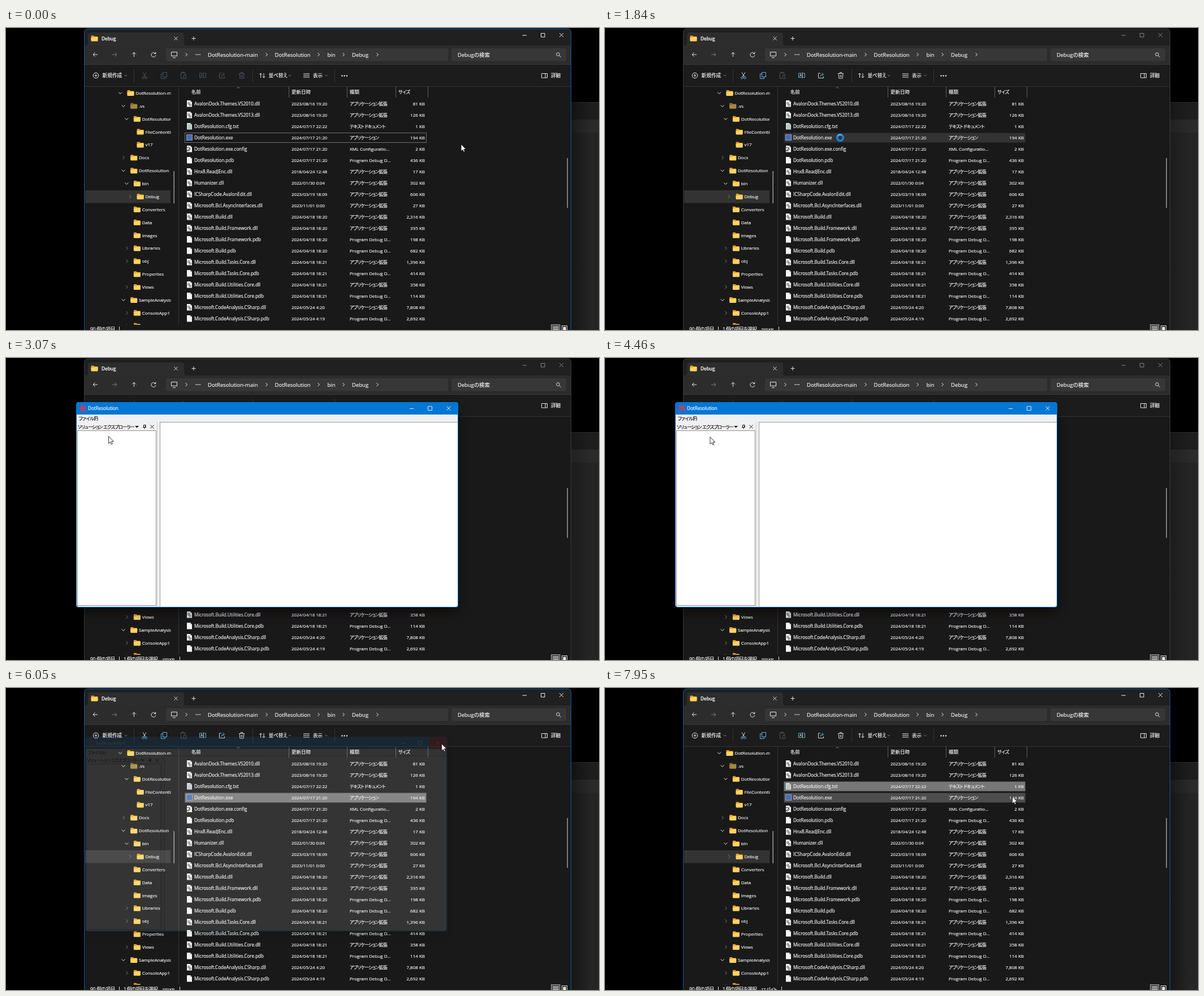
These frames come from a looping animation (1049 by 534 pixels, 8000 ms). An HTML page:

```html
<!DOCTYPE html>
<html lang="ja">
<head>
<meta charset="utf-8">
<title>DotResolution</title>
<style>
html, body { margin: 0; width: 100%; height: 100%; overflow: hidden; background: #000; }
svg { display: block; width: 100vw; height: 100vh; }
text { font: 8px 'Open Sans', 'Noto Sans CJK JP', 'Noto Sans CJK', sans-serif; color: #f4f4f4; fill: currentColor; stroke: currentColor; stroke-width: .18; white-space: pre; }
.kana { font-feature-settings: 'palt'; letter-spacing: -.7px; }
.line { fill: none; stroke: #e6e6e6; stroke-width: 1; }
.dim { stroke: #7c7c7c; }
.ink { stroke: #111; }
.caps, .tool, .acc { fill: none; stroke: #858585; stroke-width: 1; }
.focus .caps { stroke: #f2f2f2; }
.frame { fill: none; stroke: #3b3b3b; }
.focus .frame { stroke: #0d5c9b; }
.tool, .acc, .off { fill: none; stroke: #46535f; }
.ready .tool { stroke: #d4d4d4; }
.ready .acc { stroke: #5fb2e0; }
.cast { filter: drop-shadow(0 9px 9px rgba(0, 0, 0, .5)); }
</style>
</head>
<body>
<svg id="stage" viewBox="0 0 1049 534" preserveAspectRatio="none"></svg>
<script>
const LOOP = 8000, TICK = 68.5;
const BURSTS = [0, 260, 1090, 1840, 2370, 4460, 5300, 6110, 6940, 7610];
const OPEN = 1860, CLOSE = 5945, EXE = 3, CFG = 2;

const text = (x, y, s, size = 8, style = '', attrs = '') =>
  `<text x="${x}" y="${y}" style="font-size:${size}px;${style}" ${attrs}>${s}</text>`;
const kana = (x, y, s, size = 8, style = '') => text(x, y, s, size, style, 'class="kana"');
const box = (x, y, w, h, fill, attrs = '') => `<rect x="${x}" y="${y}" width="${w}" height="${h}" fill="${fill}" ${attrs}/>`;
const path = (d, cls = 'line') => `<path d="${d}" class="${cls}"/>`;
const ring = (x, y, r, cls) => `<circle cx="${x}" cy="${y}" r="${r}" class="${cls}"/>`;
const dots = (xs, y, r) => xs.map(x => `<circle cx="${x}" cy="${y}" r="${r}" fill="#eee"/>`).join('');
const right = (x, y, cls) => path(`M${x - 1.5} ${y - 3}l3 3-3 3`, cls);
const down = (x, y, cls) => path(`M${x - 3} ${y - 1.5}l3 3 3-3`, cls);

function folder(x, y, attrs = '') {
  return `<g transform="translate(${x} ${y})" ${attrs}>
    <path d="M0-4q0-1 1-1h3.5l1.5 1.5h5q1 0 1 1V3H0z" fill="#e9a520"/>
    <path d="M0-1.8h4.5l1.4-1H11q1 0 1 1V4q0 1-1 1H1q-1 0-1-1z" fill="#ffd262"/></g>`;
}

function paper(y, kind) {
  if (kind === 'a') return box(319.5, y - 5.5, 10, 10, '#4a6cb4', 'stroke="#8aa0cc"');
  const marks = {
    d: '<g fill="none" stroke="#777" stroke-width="1.3"><circle cx="3.3" cy="-.8" r="1.5"/><circle cx="5.7" cy="2.2" r="1.5"/></g>',
    t: '<path d="M1.5-2.5h5M1.5-.5h6M1.5 1.5h6M1.5 3.5h6" stroke="#8b9aa2" stroke-width=".7"/>',
    x: '<circle cx="2.5" r="3.2" fill="#eee" stroke="#333"/><path d="M1 4l4-6" stroke="#333"/>'
  };
  return `<g transform="translate(320 ${y})"><path d="M0-6h6l3 3V5.5H0z" fill="${kind === 't' ? '#d4dddd' : '#f4f4f4'}"/>
    <path d="M6-6v3h3z" fill="#aaa"/>${marks[kind] || ''}</g>`;
}

// depth, chevron (v open, > closed, - none), label
const TREE = `0v DotResolution-main
1v .vs
2v DotResolution
3- FileContentIndex
3- v17
1> Docs
1v DotResolution
2v bin
3> Debug
2- Converters
2- Data
2- Images
2> Libraries
2> obj
2- Properties
2> Views
1v SampleAnalysisApp
2> ConsoleApp1
2> ConsoleApp2`.split('\n');

const TYPES = {
  d: 'アプリケーション拡張', t: 'テキスト ドキュメント', a: 'アプリケーション',
  x: 'XML Configuratio...', p: 'Program Debug D...'
};
const FILES = `AvalonDock.Themes.VS2010.dll|2023/08/16 19:20|d|81
AvalonDock.Themes.VS2013.dll|2023/08/16 19:20|d|126
DotResolution.cfg.txt|2024/07/17 22:22|t|1
DotResolution.exe|2024/07/17 21:20|a|194
DotResolution.exe.config|2024/07/17 21:20|x|2
DotResolution.pdb|2024/07/17 21:20|p|436
Hnx8.ReadJEnc.dll|2018/04/24 12:48|d|17
Humanizer.dll|2022/01/30 0:04|d|302
ICSharpCode.AvalonEdit.dll|2023/03/19 18:09|d|606
Microsoft.Bcl.AsyncInterfaces.dll|2023/11/01 0:00|d|27
Microsoft.Build.dll|2024/04/18 18:20|d|2,316
Microsoft.Build.Framework.dll|2024/04/18 18:20|d|395
Microsoft.Build.Framework.pdb|2024/04/18 18:20|p|198
Microsoft.Build.pdb|2024/04/18 18:20|p|682
Microsoft.Build.Tasks.Core.dll|2024/04/18 18:21|d|1,396
Microsoft.Build.Tasks.Core.pdb|2024/04/18 18:21|p|414
Microsoft.Build.Utilities.Core.dll|2024/04/18 18:21|d|358
Microsoft.Build.Utilities.Core.pdb|2024/04/18 18:21|p|114
Microsoft.CodeAnalysis.CSharp.dll|2024/05/24 4:20|d|7,808
Microsoft.CodeAnalysis.CSharp.pdb|2024/05/24 4:19|p|2,692`.split('\n');

function treeRow(row, i) {
  const d = +row[0], y = 115 + 22.87 * i, x = 5.7 * d;
  const chevron = { v: down(202 + x, y), '>': right(202.5 + x, y, 'line dim'), '-': '' }[row[1]];
  return chevron + folder(214.5 + x, y, i === 1 ? 'opacity=".6"' : '') + text(229.3 + x, y + 3, row.slice(3));
}

function fileRow(row, i) {
  const [name, date, kind, size] = row.split('|'), y = 134 + 20 * i;
  const label = 'xp'.includes(kind) ? text : kana;
  return paper(y, kind) + text(333, y + 3, name, 8.05) + text(505, y + 3, date, 7.8) + label(608, y + 3, TYPES[kind]) +
    text(741, y + 3, size + ' KB', 8, 'text-anchor:end');
}

function backdrop() {
  return box(1000, 131, 49, 31, '#1e1e1e') + box(1000, 131, 49, 1, '#303030') + box(1000, 162, 49, 23, '#2b2b2b') +
    box(1000, 185, 49, 349, '#252525') + box(1000, 131, 36, 403, 'url(#shade)', 'id="shadow"');
}

function titleAndNav() {
  return box(138, 1, 862, 540, '#191919', 'rx="6"') +
    '<path d="M139 31V7q0-5 5-5H994q5 0 5 5V31z" fill="#202020"/>' +
    '<path d="M141 31q4 0 4-4V13q0-5 5-5H310q5 0 5 5V27q0 4 4 4z" fill="#2d2d2d"/>' +
    box(139, 31, 860, 33, '#2c2c2c') + box(139, 64, 860, 1, '#393939') + box(139, 65, 860, 38, '#1c1c1c') + box(139, 103, 860, 1, '#333') +
    folder(150.5, 18.5) + text(169, 22, 'Debug', 8.2, 'font-weight:600') +
    path('M297.5 15.5l6 6m0-6l-6 6M328.5 18.5h7m-3.5-3.5v7') +
    path('M913.5 13h7.5M946.5 9.5h6.5v6.5h-6.5zM979 9l7 7m0-7l-7 7', 'caps') +
    path('M162 47h-8m3.5-3.5l-3.5 3.5 3.5 3.5M226.5 51v-8m-3.5 3.5l3.5-3.5 3.5 3.5') +
    path('M188 47h8m-3.5-3.5l3.5 3.5-3.5 3.5', 'line dim') +
    path('M264.5 45.5a4 4 0 1 0 .4 2.6M264.8 42.5v3h-3') +
    box(283, 36, 499, 22.5, '#373737', 'rx="3"') + box(788, 36, 203, 22.5, '#373737', 'rx="3"') +
    path('M292.5 42.5h10v7h-10zM295 52.5h5') +
    [319, 461, 553, 597, 657].map(x => right(x, 47)).join('') + dots([336.5, 339.7, 343], 47, 0.9) +
    text(357, 50.5, 'DotResolution-main', 9.5) + text(475.5, 50.5, 'DotResolution', 9.5) +
    text(568.5, 50.5, 'bin', 9.5) + text(612, 50.5, 'Debug', 9.5) + text(799, 50.5, 'Debugの検索', 9.4) +
    ring(976.5, 46.5, 2.8, 'line') + path('M978.6 48.6l3 3');
}

function toolbar() {
  return [226, 436, 581].map(x => box(x, 72, 1, 24, '#333')).join('') +
    ring(159, 84, 4.8, 'line') + path('M156.5 84h5m-2.5-2.5v5') + text(170.5, 87, '新規作成', 8.7) +
    [212, 502, 566.5].map(x => path(`M${x - 2.2} 83l2.2 2 2.2-2`, 'line dim')).join('') +
    path('M242 78.5l5 8.5m1-8.5l-5 8.5', 'tool') + ring(242.5, 88, 1.8, 'acc') + ring(247.5, 88, 1.8, 'acc') +
    path('M277.5 78.5h7v8h-7zM277 81h-2.5v8.5h7V87', 'acc') +
    path('M317 83v-3.5h-7.5v9.5h4M311.5 79.5v-1.5h3.5v1.5M314.5 83.5h4v6h-4z', 'off') +
    path('M348 80h-5.5v7.5h5.5M351 80h2.5v7.5h-2.5', 'acc') + path('M344.5 86l1.7-4.5 1.7 4.5M349.5 78.5v10.5', 'tool') +
    path('M381 80h-3.5v8.5h9v-3', 'tool') + path('M380.5 86q.5-4 5-4m-2-3l3 3-3 3', 'acc') +
    path('M412 80.5h10M415.5 80v-1.5h3v1.5M413 81l.8 8h6.4l.8-8M416 83v4m2 0v-4', 'tool') +
    path('M450.5 88v-8m-2.5 2.5l2.5-2.5 2.5 2.5M456 80v8m-2.5-2.5l2.5 2.5 2.5-2.5') +
    kana(464.5, 87, '並べ替え', 8.7, 'letter-spacing:-.2px') + path('M526 81h11m-11 3h11m-11 3h11') + text(543, 87, '表示', 8.5) +
    dots([594.5, 598.7, 603], 84.5, 1.2) +
    path('M947.5 80.5h10v7.5h-10zM954 80.5v7.5') + text(964, 87, '詳細', 8.6);
}

function panes() {
  return box(140, 287, 151, 22.5, '#333') + `<g clip-path="url(#side)">${TREE.map(treeRow).join('')}</g>` +
    box(296.5, 253, 1.5, 57, '#9a9a9a') + box(305, 104, 1, 421, '#333') + box(992.5, 230, 1.5, 88, '#9a9a9a') +
    path('M408.5 106.5l2.5-2 2.5 2', 'line dim') +
    [500, 603, 689, 746].map(x => box(x, 104, 1, 19, '#5c5c5c')).join('') +
    text(328, 116, '名前', 8.3) + text(505, 116, '更新日時', 8.5) + text(608, 116, '種類', 8.5) + kana(694, 116, 'サイズ', 8.3) +
    box(316.5, 0, 427, 17, '#4d4d4d', 'id="hover"') + box(316.5, 0, 427, 17, 'none', 'id="picked"') +
    FILES.map(fileRow).join('') +
    kana(149, 535.5, '90 個の項目', 8.6, 'letter-spacing:-.3px') + box(200, 528, 1, 8, '#ddd') +
    `<g id="status">${kana(208, 535.5, '1 個の項目を選択', 8.6)}${text(276, 535.5, '', 8, '', 'id="size" class="kana"')}
      ${box(307, 528, 1, 8, '#ddd', 'id="bar"')}</g>` +
    box(964.5, 524.5, 15.5, 12, '#555', 'stroke="#999"') + path('M967.5 528.5h10m-10 2.5h10m-10 2.5h10') +
    box(983.5, 526.5, 9, 9, '#111', 'stroke="#ddd"') + box(985.5, 528.5, 5, 6, '#fff');
}

function appWindow() {
  return '<g id="app">' + box(124, 78, 676, 363, '#f0f0f0', 'rx="5" class="cast"') + '<g clip-path="url(#round)">' +
    box(124, 78, 676, 22, '#0277d5') + box(767, 78, 33, 22, '#e81123', 'id="shut"') +
    box(131, 84, 10, 10, '#a3476f') + text(145, 92, 'DotResolution', 8.1, 'color:#fff') +
    path('M714 89.5h7.5M746.5 85.5h7v7h-7zM779.5 85.5l7 7m0-7l-7 7') +
    kana(129, 110, 'ファイル(F)', 8.4, 'color:#111') + kana(127, 124.5, 'ソリューション エクスプローラー', 8.1, 'color:#111') +
    '<path d="M228 120h7l-3.5 3.5z" fill="#111"/>' +
    path('M243.5 118.5h3.5v4h-3.5zM242 122.5h6M245 122.5v3M246.5 118.5v4M255.5 118.5l6 6m0-6l-6 6', 'line ink') +
    box(126.5, 128.5, 139, 309, '#fff', 'stroke="#8c9096"') + box(267, 113, 1, 327, '#d0d0d0') +
    box(272.5, 113.5, 530, 327, '#fff', 'stroke="#9a9a9a"') +
    '</g>' + box(124.5, 78.5, 675, 362, 'none', 'rx="4.5" stroke="#0277d5"') + '</g>';
}

const stage = document.getElementById('stage');
stage.innerHTML = `<defs>
  <linearGradient id="shade"><stop offset="0" stop-opacity=".4"/><stop offset="1" stop-opacity="0"/></linearGradient>
  <clipPath id="side"><rect x="139" y="104" width="152.5" height="420.5"/></clipPath>
  <clipPath id="round"><rect x="124" y="78" width="676" height="363" rx="5"/></clipPath></defs>
  ${backdrop()}
  <g id="explorer">${titleAndNav()}${toolbar()}${panes()}
    <rect x="138.5" y="1.5" width="861" height="545" rx="6" class="frame"/></g>
  ${appWindow()}
  <g id="arrow"><path d="M.5.5V13l2.9-2.6 1.9 4.1 2-.9-1.9-4H9.4z" fill="#fff" stroke="#000" stroke-width=".8"/></g>
  <g id="busy" fill="none"><circle r="5.3" stroke="#1b83dc" stroke-width="3.6"/><path d="M0-5.3A5.3 5.3 0 0 1 5.3 0" stroke="#4aa8f2" stroke-width="3"/></g>`;

const el = Object.fromEntries([...stage.querySelectorAll('[id]')].map(e => [e.id, e]));
const clamp = v => Math.max(0, Math.min(1, v));
const show = (e, on) => e.setAttribute('visibility', on ? 'visible' : 'hidden');
const both = u => u * u * (3 - 2 * u), out = u => 1 - (1 - u) ** 2, into = u => u ** 1.4;

// start, end, easing, from, bend, to
const MOVES = [
  [220, 1005, both, [804.5, 205], [690, 191], [416, 194]],
  [1870, 2100, both, [416, 194], [416, 197], [415, 198]],
  [2330, 3050, both, [415, 198], [290, 190], [181, 138]],
  [4420, 5210, both, [181, 138], [480, 221], [720, 125]],
  [5260, 5500, out, [720, 125], [755, 103], [774, 97]],
  [5520, 5690, both, [774, 97], [773, 97], [770, 98]],
  [6070, 6384, into, [770, 98], [690, 130], [573.5, 161]],
  [6384, 6850, out, [573.5, 161], [480, 174], [400, 176]],
  [7580, 7945, both, [400, 176], [560, 183], [720, 191.5]]
];

function pointer(t) {
  const [a, b, ease, p, q, r] = MOVES.filter(m => m[0] <= t).pop() || MOVES[0];
  const u = ease(clamp((t - a) / (b - a))), v = 1 - u;
  return [0, 1].map(k => v * v * p[k] + 2 * v * u * q[k] + u * u * r[k]);
}

function snap(t) {
  const start = BURSTS.filter(b => b <= t).pop();
  return start + Math.floor((t - start + 8) / TICK) * TICK;
}

function draw(now) {
  const t = snap(now), [x, y] = pointer(t);
  const clicked = t >= 1090, focus = t < 1840 || t >= CLOSE;
  const picked = t >= 6940 ? CFG : EXE;
  const row = Math.floor((y - 124) / 20);

  el.explorer.setAttribute('class', (focus ? 'focus ' : '') + (clicked ? 'ready' : ''));
  el.shadow.setAttribute('opacity', focus ? 1 : 0.6);
  show(el.hover, focus && y >= 124 && x > 316 && x < 744);
  el.hover.setAttribute('y', 125.5 + 20 * row);
  el.picked.setAttribute('y', 125.5 + 20 * picked);
  el.picked.setAttribute('fill', !clicked ? 'none' : focus ? '#777' : '#333');
  el.picked.setAttribute('stroke', clicked ? 'none' : '#6e6e6e');

  show(el.status, clicked);
  el.size.textContent = picked === CFG ? '17 バイト' : '193 KB';
  el.bar.setAttribute('x', picked === CFG ? 312 : 307);

  const opened = out(clamp((t - OPEN) / 240)), closed = clamp((t - CLOSE) / 123);
  const scale = (0.9 + 0.1 * opened) * (1 - 0.06 * closed);
  const visible = t > OPEN && closed < 1;
  show(el.app, visible);
  el.app.setAttribute('opacity', opened * (1 - closed));
  el.app.setAttribute('transform', `translate(425 240) scale(${scale}) translate(-425 -240)`);
  show(el.shut, visible && t > 5560);

  const busy = t > 1430 && t < 2040;
  show(el.arrow, !busy);
  show(el.busy, busy);
  el.arrow.setAttribute('transform', `translate(${x} ${y})`);
  el.busy.setAttribute('transform', `translate(${x} ${y}) rotate(${t * 0.36})`);
}

function loop() {
  draw(performance.now() % LOOP);
  requestAnimationFrame(loop);
}
loop();
</script>
</body>
</html>
```
